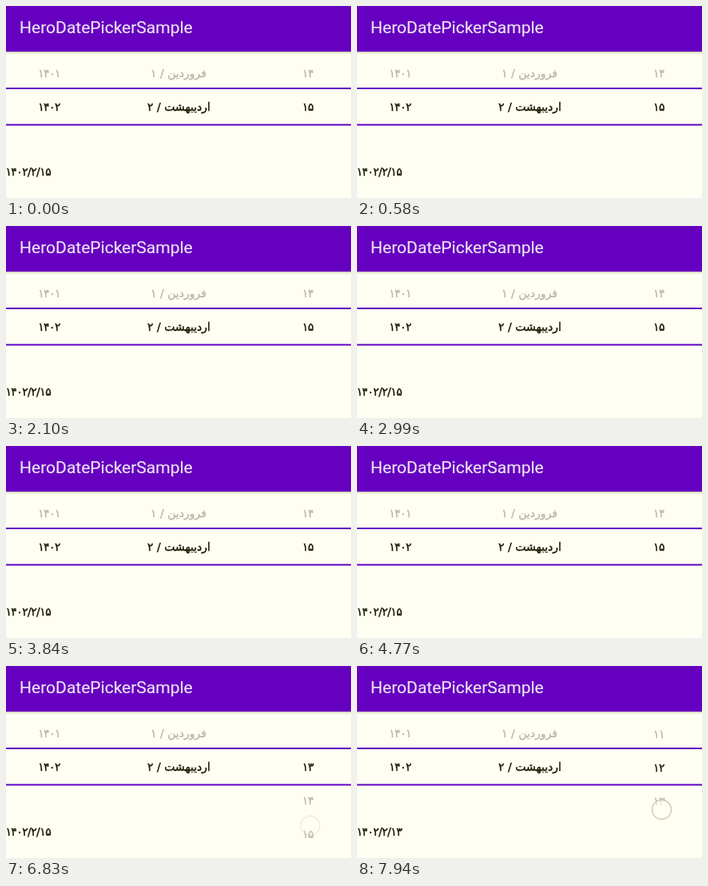
These frames come from a looping animation (432x240 px, 7.99 s). An HTML page:

```html
<!DOCTYPE html>
<html lang="fa">
<head>
<meta charset="utf-8">
<title>HeroDatePickerSample</title>
<style>
  html, body { margin: 0; width: 100%; height: 100%; overflow: hidden; background: #fefef2; }
  svg { display: block; width: 432px; height: 240px; }
  text {
    font: 14px "DejaVu Sans", sans-serif;
    letter-spacing: -.6px;
    fill: #1a1a00; stroke: #1a1a00; stroke-width: .4px;
  }
  .title {
    font: 21px Roboto, sans-serif;
    letter-spacing: 0;
    fill: #ece2f2; stroke: #ece2f2; stroke-width: .2px;
  }
  .label { text-anchor: middle; }
  .month { direction: rtl; letter-spacing: 0; }
  .dim { opacity: .3; }
</style>
</head>
<body>
<svg viewBox="0 0 432 240">
  <defs>
    <linearGradient id="shade" x2="0" y2="1">
      <stop stop-color="#808040" stop-opacity=".4"/>
      <stop offset="1" stop-color="#808040" stop-opacity="0"/>
    </linearGradient>
  </defs>
  <rect width="432" height="57" fill="#6600c0"/>
  <rect y="57" width="432" height="3" fill="url(#shade)"/>
  <text class="title" x="17.1" y="34">HeroDatePickerSample</text>

  <path d="M0 103.1H432M0 148.4H432" stroke="#6000c4" stroke-width="2"/>
  <text class="label dim" x="54" y="89">۱۴۰۱</text>
  <text class="label" x="54" y="131">۱۴۰۲</text>
  <text class="label month dim" x="216" y="88.5">فروردین / ۱</text>
  <text class="label month" x="216.5" y="130.5">اردیبهشت / ۲</text>

  <text class="label day" x="378"></text>
  <text class="label day" x="378"></text>
  <text class="label day" x="378"></text>
  <text id="date" x="-.6" y="212"></text>
  <circle id="touch" r="12" fill="#fefef2" fill-opacity=".6" stroke="#c9c9b0" stroke-width="1.3"/>
</svg>
<script>
const LOOP = 7990, ROW = 42, LAST_DAY = 15, MIN_ALPHA = .3;
const days = document.querySelectorAll('.day');
const date = document.getElementById('date');
const touch = document.getElementById('touch');

const progress = (t, from, to) => Math.min(1, Math.max(0, (t - from) / (to - from)));
const smooth = p => p * p * (3 - 2 * p);
const easeOut = p => 1 - (1 - p) ** 3;
const persian = n => String(n).replace(/\d/g, d => String.fromCharCode(0x06F0 + +d));

// Finger position, visibility and list offset for the two drags.
function gesture(t) {
  if (t < 7200) {
    const drag = smooth(progress(t, 5700, 6580));
    const snap = easeOut(progress(t, 6640, 6900));
    return {
      value: t < 6920 ? 15 : 13,
      offset: t < 6920 ? 74 * drag + 9.9 * snap : 0,
      x: 375 + 6 * drag,
      y: 126 + 73.5 * drag,
      alpha: progress(t, 5580, 5660) * (1 - progress(t, 6700, 6900))
    };
  }
  const drag = smooth(progress(t, 7330, 7940));
  return {
    value: 13,
    offset: 43 * drag,
    x: 379 + 2.5 * drag,
    y: 137 + 42.5 * drag,
    alpha: progress(t, 7230, 7310)
  };
}

function draw(t) {
  const g = gesture(t);
  const current = g.value - Math.floor(g.offset / ROW);
  const shift = g.offset % ROW;
  days.forEach((label, i) => {
    const row = i - 1, day = current + row;
    const distance = Math.abs(row * ROW + shift) / ROW;
    label.textContent = day > LAST_DAY ? '' : persian(day);
    label.setAttribute('y', 131 + row * ROW + shift);
    label.style.opacity = Math.max(MIN_ALPHA, 1 - distance);
  });
  date.textContent = persian(`1402/2/${g.value}`);
  touch.setAttribute('cx', g.x);
  touch.setAttribute('cy', g.y);
  touch.style.opacity = g.alpha;
}

const start = performance.now();
function tick() {
  draw((performance.now() - start) % LOOP);
  requestAnimationFrame(tick);
}
tick();
</script>
</body>
</html>
```
